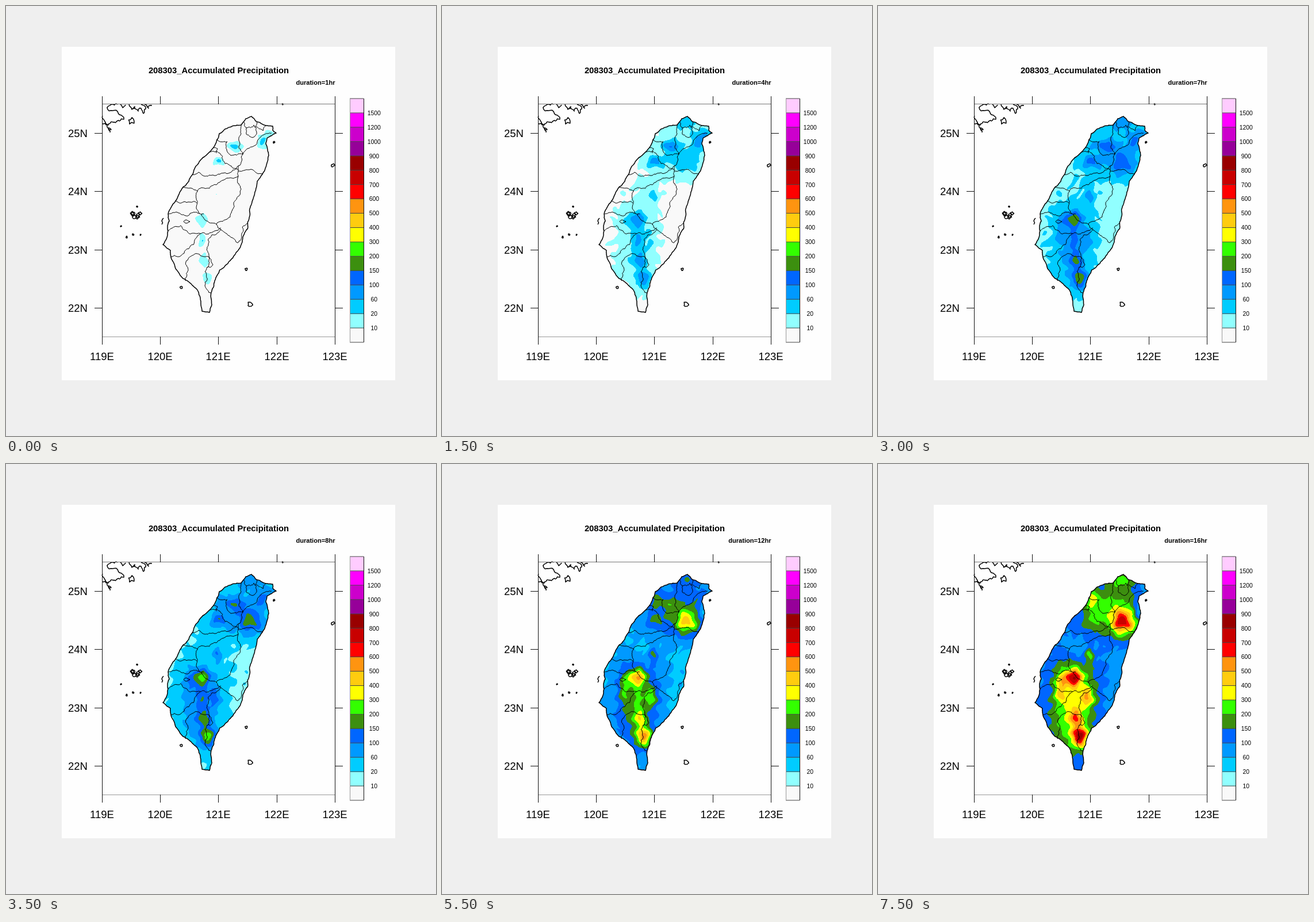
Recreate the animation shown at these times as an HTML page with a canvas. Size 748 by 748 pixels, loop 8 s.

```html
<!DOCTYPE html>
<html lang="en">
<head>
<meta charset="utf-8">
<title>Accumulated Precipitation</title>
<style>
  html, body { margin: 0; width: 100%; height: 100%; overflow: hidden; background: #efefef; }
  canvas, svg { position: absolute; left: 0; top: 0; display: block; }
  text { font-family: "Liberation Sans", Arial, sans-serif; fill: #000; }
  .bold { font-weight: 700; }
  .coast { fill: none; stroke: #000; stroke-width: 1.5; stroke-linejoin: round; }
  .county { fill: none; stroke: #000; stroke-width: 1; }
</style>
</head>
<body>
<canvas id="map" width="748" height="748"></canvas>
<svg id="chart" width="748" height="748" viewBox="0 0 748 748"></svg>
<script>
const STEP = 500, HOURS = 16;
const COLORS = ['#f9f9f9', '#91ffff', '#00ccff', '#0099ff', '#0066ff', '#3c8f0f', '#33ff00', '#ffff00',
  '#ffcc0f', '#ff9410', '#ff0000', '#c80000', '#990000', '#960099', '#cc00cc', '#ff00ff', '#ffccff'];
const LIMITS = [10, 20, 60, 100, 150, 200, 300, 400, 500, 600, 700, 800, 900, 1000, 1200, 1500];

// A rain cell: centre, radii, and its share of the colour level in the first and last hour
const cell = (x, y, rx, ry, from, to) => ({ x, y, rx, ry, from, to });
const cells = [
  cell(410, 255, 60, 50, 1.6, 2.9),   // northern belt
  cell(426, 274, 18, 20, 0.5, 6),
  cell(398, 243, 13, 10, 2.2, 0.4),
  cell(368, 270, 13, 9, 2.6, 0.8),
  cell(446, 234, 11, 13, 2.6, 0),
  cell(424, 200, 20, 14, 1.6, 2),
  cell(462, 222, 16, 12, 1.8, -0.9),
  cell(454, 254, 13, 16, 0.6, -2.3),
  cell(372, 234, 11, 18, -0.4, 2.4),
  cell(352, 318, 28, 22, 0.4, -1.6),  // dry centre
  cell(368, 330, 8, 18, 1.4, 2.4),
  cell(338, 415, 40, 85, 1.4, 3.8),   // southern belt
  cell(339, 371, 15, 14, 2, 5.8),
  cell(365, 404, 11, 17, 0.2, 3.2),
  cell(317, 390, 9, 22, 0, 2.7),
  cell(341, 407, 7, 12, 1.9, 0),
  cell(343, 440, 10, 13, 1.8, 3.4),
  cell(350, 473, 13, 17, 2, 7)
];

const ripple = (x, y) => 0.3 * Math.sin(x / 6 + 2 * Math.sin(y / 13)) * Math.sin(y / 7 + 2 * Math.sin(x / 11));

// Colour level everywhere: a rising background plus the cells
function levelField(hour) {
  const p = (hour - 1) / (HOURS - 1);
  const base = -1.3 + 4.9 * p ** 0.65;
  const active = cells.map(c => ({ ...c, amp: c.from + (c.to - c.from) * p ** 1.5 }));
  return (x, y) => active.reduce((sum, c) =>
    sum + c.amp * Math.exp(-(((x - c.x) / c.rx) ** 2) - ((y - c.y) / c.ry) ** 2), base + ripple(x, y));
}

const BOX = { x: 268, y: 188, w: 208, h: 350 };
const RGB = COLORS.map(c => [1, 3, 5].map(i => parseInt(c.slice(i, i + 2), 16)));

function paintRain(hour) {
  const level = levelField(hour);
  const layer = document.createElement('canvas');
  layer.width = BOX.w;
  layer.height = BOX.h;
  const ctx = layer.getContext('2d');
  const image = ctx.createImageData(BOX.w, BOX.h);
  for (let y = 0, at = 0; y < BOX.h; y++) {
    for (let x = 0; x < BOX.w; x++, at += 4) {
      const px = BOX.x + x + 2 * Math.sin(y / 4 + x / 9);
      const py = BOX.y + y + 2 * Math.sin(x / 4.5 - y / 11);
      const band = Math.max(0, Math.min(16, Math.floor(level(px, py))));
      image.data.set(RGB[band], at);
      image.data[at + 3] = 255;
    }
  }
  ctx.putImageData(image, 0, 0);
  return layer;
}

let seed = 7;
function random() {
  seed = (seed * 16807) % 2147483647;
  return seed / 2147483647;
}

// Joins key points with a ragged line by midpoint displacement
function ragged(keys, amount) {
  const points = keys.split(' ').map(p => p.split(',').map(Number));
  const out = [points[0]];
  function join(a, b) {
    const dx = b[0] - a[0], dy = b[1] - a[1];
    if (Math.hypot(dx, dy) < 3.5) return out.push(b);
    const k = (random() - 0.5) * amount;
    const mid = [(a[0] + b[0]) / 2 - dy * k, (a[1] + b[1]) / 2 + dx * k];
    join(a, mid);
    join(mid, b);
  }
  for (let i = 1; i < points.length; i++) join(points[i - 1], points[i]);
  return 'M' + out.map(p => p.map(v => v.toFixed(1)).join(' ')).join('L');
}

// Small closed islet of uneven radius
function islet(x, y, r) {
  const corners = Array.from({ length: 9 }, (_, i) => {
    const a = i * Math.PI * 2 / 9, d = r * (0.5 + random() * 0.8);
    return [(x + d * Math.cos(a)).toFixed(1), (y + d * Math.sin(a)).toFixed(1)].join(' ');
  });
  return 'M' + corners.join('L') + 'Z';
}

const land = ragged('427,192 434,200 449,207 464,209 464,216 470,221 454,230 452,240 457,260 455,270 448,289 ' +
  '437,305 430,335 424,365 411,408 397,434 386,448 372,459 363,478 358,496 358,520 354,533 341,531 338,508 ' +
  '334,496 318,480 308,474 295,457 286,432 286,425 273,415 281,398 281,385 284,374 282,362 295,339 308,315 ' +
  '318,305 332,277 342,264 354,254 361,246 371,222 381,214 409,207 417,196 427,192', 0.16) + 'Z';

const counties = [
  '409,207 409,222 405,234 412,258 404,278',
  '462,221 438,233 420,248 412,258',
  '414,202 418,223 431,228 436,220 431,207 418,212',
  '436,202 434,210 447,217 452,208',
  '366,232 385,236 384,251 391,260 412,258',
  '354,254 372,256 388,276 404,285',
  '361,246 368,248 366,256',
  '324,293 335,289 360,294 404,278 404,287 426,284 447,292',
  '308,315 333,322 340,316 366,311 378,303 404,296 404,287',
  '404,296 405,309 396,344 392,360 384,371 366,380 346,372 340,362',
  '333,322 331,352 337,361',
  '295,339 308,341 332,343',
  '283,362 300,360 318,364 344,362',
  '281,391 304,382 338,396 352,397 374,386',
  '309,375 314,372 320,375 314,378 309,375',
  '286,436 310,430 338,396',
  '366,380 384,396 403,412 411,385 420,378',
  '312,478 313,445 318,438 352,436 346,462 350,476 346,486 357,500',
  '374,388 358,398 352,415 360,450 349,455'
];
const mainland = [
  '168,191 178,207 190,203 205,197 197,189 177,180 194,171',
  '168,205 176,207 183,215 178,212 181,220',
  '199,171 203,177 208,172',
  '214,171 219,180 224,175 230,183 235,178 239,187 243,179 235,171',
  '241,171 248,178 248,174 254,173',
  '274,369 271,374 271,380'
];

const chart = document.getElementById('chart');
function add(tag, attrs, text) {
  const el = document.createElementNS('http://www.w3.org/2000/svg', tag);
  for (const name in attrs) el.setAttribute(name, attrs[name]);
  if (text) el.textContent = text;
  return chart.appendChild(el);
}
const path = (d, cls) => add('path', { d, class: cls });
const line = (x1, y1, x2, y2, stroke = '#111') => add('line', { x1, y1, x2, y2, stroke, 'stroke-width': 1 });
const label = (x, y, size, anchor, text, cls = '') =>
  add('text', { x, y, 'font-size': size, 'text-anchor': anchor, class: cls }, text);

function drawMap() {
  counties.forEach(keys => path(ragged(keys, 0.4), 'county'));
  mainland.forEach(keys => path(ragged(keys, 0.6), 'coast'));
  path(land, 'coast');
  const islets = [[218, 200, 5], [305, 490, 2], [418, 458, 2.5], [424, 520, 4.5], [466, 237, 1.5], [569, 277, 3],
    [481, 171, 1], [228, 349, 1], [200, 383, 1], [210, 402, 1.5], [221, 398, 1.5], [234, 398, 1]];
  islets.forEach(([x, y, r]) => path(islet(x, y, r), 'coast'));
  for (let i = 0; i < 6; i++) path(islet(218 + random() * 16, 359 + random() * 11, 3.2), 'coast');
}

function drawAxes() {
  line(168, 170.5, 572, 170.5, '#777');
  line(168, 575.5, 572, 575.5, '#999');
  line(167.5, 171, 167.5, 575);
  line(572.5, 171, 572.5, 575);
  for (let i = 0; i < 5; i++) {
    const x = Math.floor(167.5 + i * 101.2) + 0.5;
    line(x, 157, x, 171);
    line(x, 575, x, 589);
    label(x - 0.5, 616, 18.5, 'middle', `${119 + i}E`);
  }
  for (let i = 0; i < 4; i++) {
    const y = Math.round(221 + i * 101.3) + 0.5;
    line(154, y, 168, y);
    line(572, y, 586, y);
    label(142, y + 6.2, 18.5, 'end', `${25 - i}N`);
  }
}

function drawLegend() {
  const top = 161, step = 424 / COLORS.length;
  COLORS.forEach((fill, i) =>
    add('rect', { x: 598, y: top + (16 - i) * step, width: 24.5, height: step + 0.3, fill }));
  for (let i = 0; i <= COLORS.length; i++) line(598, top + i * step, 622, top + i * step, '#444');
  LIMITS.forEach((limit, i) => label(640.3, top + (16 - i) * step + 3.9, 10.4, 'middle', String(limit)));
  line(598.5, 161, 598.5, 585, '#999');
  line(622.5, 161, 622.5, 585);
}

drawMap();
drawAxes();
drawLegend();
label(370, 116.5, 14.8, 'middle', '208303_Accumulated Precipitation', 'bold');
const duration = label(572.5, 136.5, 11.1, 'end', 'duration=1hr', 'bold');
const ctx = document.getElementById('map').getContext('2d');
const landShape = new Path2D(land);
const layers = [];
let shown = 0;

function show(hour) {
  layers[hour] ||= paintRain(hour);
  ctx.fillStyle = '#fefefe';
  ctx.fillRect(97, 71, 580, 580);
  ctx.save();
  ctx.clip(landShape);
  ctx.drawImage(layers[hour], BOX.x, BOX.y);
  ctx.restore();
  duration.textContent = `duration=${hour}hr`;
  shown = hour;
}

const start = performance.now();
function tick() {
  const elapsed = performance.now() - start;
  const hour = Math.floor(elapsed / STEP) % HOURS + 1;
  if (hour !== shown) show(hour);
  requestAnimationFrame(tick);
}
tick();
</script>
</body>
</html>
```
